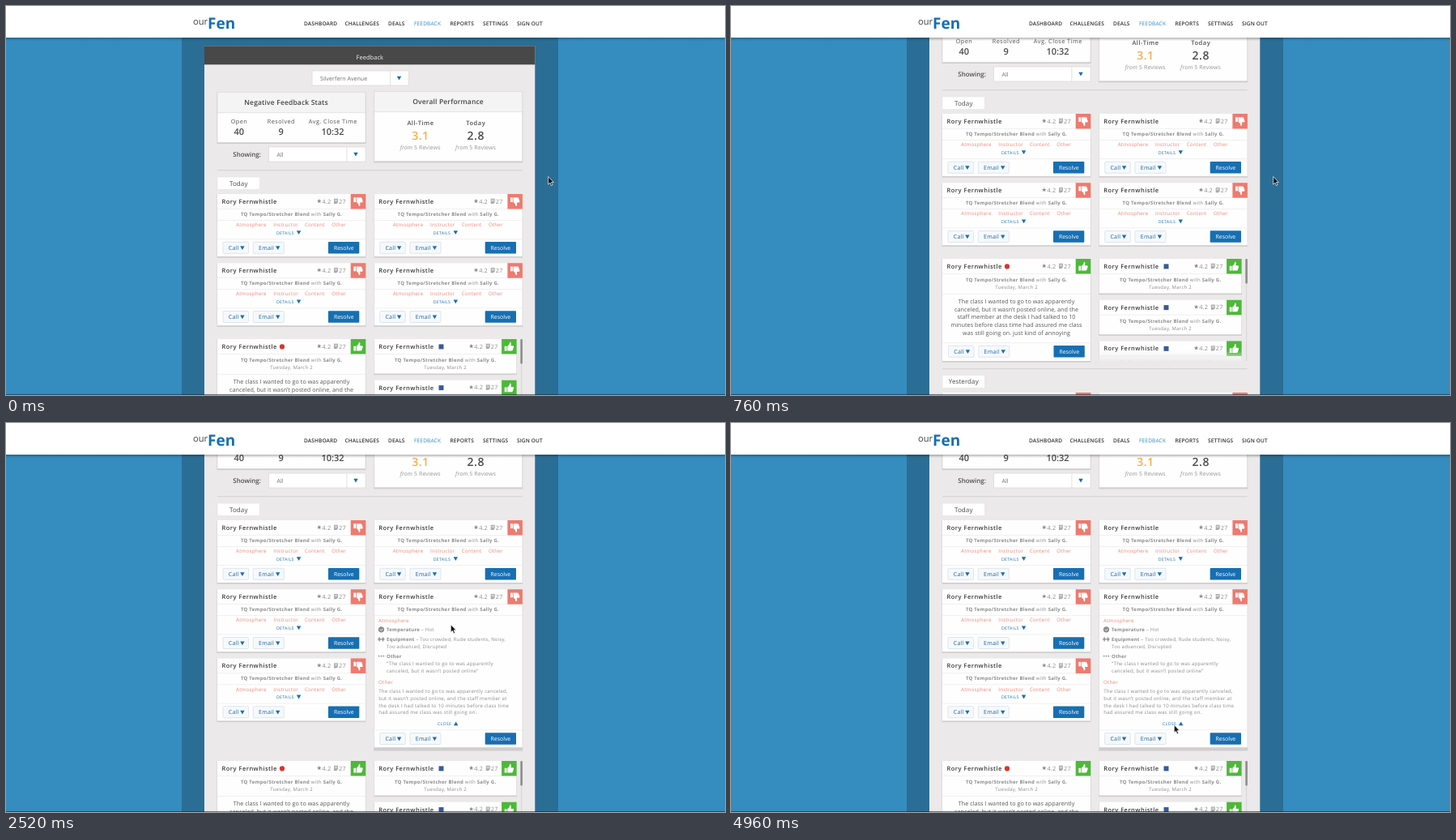
Animation, 888 px wide and 480 px high, one loop 5000 ms. Source, as an HTML page:

```html
<!DOCTYPE html>
<html lang="en">
<head>
<meta charset="utf-8">
<title>Feedback dashboard</title>
<style>
  html, body { margin: 0; width: 100%; height: 100%; overflow: hidden; background: #358cbe; }
  svg { display: block; width: 888px; height: 480px; }
  text { font-family: "Open Sans", sans-serif; text-rendering: geometricPrecision; white-space: pre; }
</style>
</head>
<body>
<svg id="stage" viewBox="0 0 888 480"></svg>
<script>
const LOOP = 5000, STEP = 40, GROW = 118, ROW = 85.2;
const BLUE = '#176fb1', CORAL = '#ef8679', RED = '#ee7a70', GREEN = '#4eb83a', GREY = '#8c8c8c', INK = '#4a4a4a';
const COL = [261, 454.7], CARD_W = 183, CARD_H = 77;
const PERSON = 'Rory Fernwhistle', LESSON = 'TQ Tempo/Stretcher Blend', COACH = 'Sally G.';

// Drawing helpers
const rect = (x, y, w, h, fill, more = '') =>
  `<rect x="${x}" y="${y}" width="${w}" height="${h}" fill="${fill}" ${more}/>`;
const path = (d, fill, more = '') => `<path d="${d}" fill="${fill}" ${more}/>`;
const group = (x, y, body, more = '') => `<g transform="translate(${x} ${y})" ${more}>${body}</g>`;
const rule = (x, y, w, fill = '#ededed') => rect(x, y, w, .8, fill);
const text = (x, y, body, size, fill = INK, { weight = 400, gap = 0, at = 'start' } = {}) =>
  `<text x="${x}" y="${y}" font-size="${size}" fill="${fill}" font-weight="${weight}" letter-spacing="${gap}" text-anchor="${at}">${body}</text>`;
const mid = (x, y, body, size, fill, weight = 400, gap = 0) =>
  text(x + gap / 2, y, body, size, fill, { weight, gap, at: 'middle' });
const bold = s => `<tspan font-weight="700">${s}</tspan>`;
const arrow = (x, y, s = 1) => path(`M${x - 2.7} ${y - 2.3 * s}h5.4l-2.7 ${4.8 * s}z`, BLUE);
const sheet = (x, y, w, h, fill = '#fefefe') =>
  rect(x - .5, y + .4, w + 1, h + 1.3, '#000', 'opacity=".12"') + rect(x, y, w, h, fill);

function thumb(x, y, good) {
  const hand = 'M-6-.6h3v6h-3zM-2.2-.6L.2-3 1-6Q2.8-6 2.6-3.6L2.2-1.2H5Q6.2-1 6 .3L4.6 4.6Q4.2 5.4 3.2 5.4H-2.2z';
  return rect(x, y, 18.5, 18.5, good ? GREEN : RED) +
    group(x + 9.3, y + 9.4, path(hand, '#fff', `transform="scale(.95 ${good ? .95 : -.95})"`));
}

function star(x, y) {
  let d = '';
  for (let i = 0; i < 10; i++) {
    const a = i * Math.PI / 5, r = i % 2 ? 1.2 : 3;
    d += (i ? 'L' : 'M') + (x + r * Math.sin(a)).toFixed(2) + ' ' + (y - r * Math.cos(a)).toFixed(2);
  }
  return path(d + 'z', GREY);
}

const note = (x, y) => path(`M${x} ${y}h5v4.5l-1.8 1.8H${x}z`, '#a9a9a9') +
  path(`M${x + .8} ${y + 1.5}h3.4M${x + .8} ${y + 3}h3.4`, 'none', 'stroke="#fff" stroke-width=".6"');

// Card parts, placed from the top left of the card
function head(w, good, shift = 0) {
  const r = w - 60 + shift;
  return text(5.5, 12, PERSON, 7.5, '#3b3b3b', { weight: 600, gap: .47 }) +
    star(r + 2.8, 8.7) + text(r + 6.5, 11.6, '4.2', 7.3, GREY, { gap: .15 }) +
    note(r + 21, 5.8) + text(r + 27, 11.6, '27', 7.3, GREY, { gap: .3 }) +
    rule(0, 18, w - 18) + thumb(w - 18.3, 0, good);
}
const lesson = (w, y) =>
  mid(w / 2, y, `${bold(LESSON)} with ${bold(COACH)}`, 6, GREY, 400, .26);
const dated = w => lesson(w, 28.4) + mid(w / 2, 37.2, 'Tuesday, March 2', 6, GREY, 400, .27);

function foot() {
  const button = (x, w, label) =>
    rect(x, 59.3, w, 14, '#f6f9fc', 'stroke="#d3dde6" stroke-width=".7" rx="1"') +
    text(x + 6.8, 68.8, label, 7, '#1a639e', { gap: .2 }) + arrow(x + w - 7.6, 66.6);
  return rule(0, 55.3, CARD_W) + button(7, 31.5, 'Call') + button(44.3, 38, 'Email') +
    rect(137, 59, 38.3, 14.6, BLUE, 'rx=".8"') + mid(156.2, 68.8, 'Resolve', 6.9, '#fff');
}

function topics() {
  const words = [['Atmosphere', 23], ['Instructor', 69.3], ['Content', 108], ['Other', 141.2]];
  return words.map(([s, x]) => text(x, 40.2, s, 6.2, CORAL, { gap: .22 })).join('') +
    text(73, 49.5, 'DETAILS', 5.2, BLUE, { gap: .3 }) + arrow(100.6, 47.5);
}

const complaint = (x, y) => group(x, y, sheet(0, 0, CARD_W, CARD_H) + head(CARD_W, false) +
  lesson(CARD_W, 27) + rule(0, 32, CARD_W) + topics() + foot());

function details() {
  const small = (x, y, s) => text(x, y, s, 6, GREY, { gap: .2 });
  const lines = (x, y, list) => list.map((s, i) => text(x, y + i * 8.9, s, 6.1, GREY, { gap: .22 })).join('');
  const title = (y, s) => text(5.3, y, s, 6.2, CORAL, { gap: .22 });
  return title(40.5, 'Atmosphere') +
    '<circle cx="8.8" cy="49.6" r="3.6" fill="#8c8c8c"/>' +
    path('M7 49.5l1.8 1.6 1.8-2.4', 'none', 'stroke="#fff" stroke-width=".8"') +
    small(15.4, 51.8, bold('Temperature') + ' – Hot') +
    path('M5.3 60.3v2.8M6.6 59v5.4M10.8 59v5.4M12.1 60.3v2.8M6.6 61.7h4.2', 'none', 'stroke="#8c8c8c" stroke-width="1.1"') +
    small(15.4, 64, bold('Equipment') + ' – Too crowded, Rude students, Noisy,') +
    small(15.4, 73, 'Too advanced, Disrupted') +
    [6, 8.8, 11.6].map(x => `<circle cx="${x}" cy="82.4" r=".9" fill="#8c8c8c"/>`).join('') +
    small(15.4, 84.6, bold('Other')) +
    lines(15.4, 93.8, ['“The class I wanted to go to was apparently', 'canceled, but it wasn’t posted online”']) +
    title(116.6, 'Other') +
    lines(5.5, 127.6, ['The class I wanted to go to was apparently canceled,',
      'but it wasn’t posted online, and the staff member at',
      'the desk I had talked to 10 minutes before class time',
      'had assured me class was still going on.']) +
    text(78.3, 167.7, 'CLOSE', 5.2, BLUE, { gap: .3 }) + arrow(101, 165.8, -1);
}

const openable = () => group(COL[1], 232 + ROW,
  `<g id="sheet">${sheet(0, 0, CARD_W, CARD_H)}</g>` + head(CARD_W, false) + lesson(CARD_W, 27) +
  rule(0, 32, CARD_W) + `<g id="topics">${topics()}</g>` +
  `<g id="details" clip-path="url(#reveal)">${details()}</g><g id="foot">${foot()}</g>`);

function praise() {
  const story = ['The class I wanted to go to was apparently', 'canceled, but it wasn’t posted online, and the',
    'staff member at the desk I had talked to 10', 'minutes before class time had assured me class',
    'was still going on. just kind of annoying'];
  const big = sheet(0, 0, CARD_W, 126) + head(CARD_W, true) + dated(CARD_W) + rule(0, 43.3, CARD_W) +
    story.map((s, i) => mid(91.5, 54.7 + i * 9.8, s, 7.2, '#575757', 400, .05)).join('') +
    group(.5, 48, foot()) + '<circle cx="80" cy="9.4" r="3.1" fill="#d8352c"/>';
  const item = i => group(0, i * 50.7, sheet(0, 0, 175.7, 42.5) + head(175.7, true, 1.4) + dated(175.7) +
    rect(79.8, 6.4, 6, 6, '#3a5a98'));
  const list = `<g clip-path="url(#list)">${item(0) + item(1) + item(2)}</g>` + rect(-1, 113, 178, 14, 'url(#fade)') +
    rect(181.3, 0, 1.2, 126, '#d9d6d6') + rect(180.6, 0, 2.6, 30.5, '#8d8d8d', 'rx="1"');
  return group(COL[0], 411, big) + group(COL[1], 411, list);
}

const tag = (y, s) => rect(261, y, 52.5, 15.6, '#fff', 'stroke="#e0dddd" stroke-width=".5"') + mid(287.2, y + 10.8, s, 8, INK, 400, .1);
const picker = (x, y, w, s) => rect(x, y, w, 18, '#fff', 'stroke="#d9d7d7" stroke-width=".7"') +
  rect(x + w - 23.5, y, .8, 18, '#dcdada') + text(x + 10, y + 12, s, 7, '#6a6a6a', { gap: .05 }) + arrow(x + w - 12, y + 9);

function summary() {
  const box = (x, y, w, h, cut) => sheet(x, y, w, h) + rect(x, y, w, cut, '#f4f4f4') + rule(x, y + cut, w, '#dedcdc') +
    `<rect x="${x}" y="${y}" width="${w}" height="${h}" fill="none" stroke="#d9d7d7" stroke-width=".7"/>`;
  const stat = (x, label, value) => mid(x, 145, label, 7.3, '#555', 400, .45) + mid(x, 159.2, value, 11, INK, 600);
  const score = (x, label, value, fill) => mid(x, 147.4, label, 7.5, '#505050', 600, .5) +
    mid(x, 165, value, 14, fill, 600, .5) + mid(x, 177.3, '<tspan font-style="italic">from</tspan> 5 Reviews', 7, '#969696', 400, .1);
  return picker(378, 80, 119.5, 'Silverfern Avenue') +
    box(261, 106.3, 183, 62, 25) + mid(346, 122.3, 'Negative Feedback Stats', 8.5, '#454545', 600, .15) +
    stat(287.7, 'Open', '40') + stat(339.7, 'Resolved', '9') + stat(403.5, 'Avg. Close Time', '10:32') +
    box(454.7, 105.3, 183, 86.4, 25) + mid(546, 121, 'Overall Performance', 8.5, '#454545', 600, .15) +
    score(511.7, 'All-Time', '3.1', '#f5ae4b') + score(580, 'Today', '2.8', INK) +
    text(280.3, 186, 'Showing:', 8, '#505050', { weight: 600 }) + picker(324.5, 174, 119.5, 'All');
}

function navbar() {
  const links = [['DASHBOARD', 368], ['CHALLENGES', 418.5], ['DEALS', 472], ['FEEDBACK', 504],
    ['REPORTS', 548.5], ['SETTINGS', 589], ['SIGN OUT', 631]];
  return rect(0, 39, 888, 4, 'url(#shade)') + rect(0, 0, 888, 39, '#fff') +
    text(231, 22.5, 'our', 11.2, '#444') + text(249, 27.5, 'Fen', 19, BLUE, { weight: 700 }) +
    links.map(([s, x]) => s === 'FEEDBACK'
      ? text(x, 24, s, 6.5, '#2a86c4', { gap: .2 })
      : text(x, 24, s, 6.5, '#2e2e2e', { weight: 600, gap: .15 })).join('');
}

const pointers =
  `<g id="arrow">${path('M0 0v9.6l2.2-2 1.5 3.5 1.6-.7-1.5-3.4h2.9z', '#111', 'stroke="#fff" stroke-width=".7"')}</g>` +
  `<g id="hand">${path('M-1 .8Q0-.6 1 .8V4.2Q2-.1+3.7 2.8 4.5Q3.8 4 4.4 5Q5.4 4.8 5.5 6V8.2Q5.2 9.8 4.4 11.4H-.4Q-2-.1 9.4-3.2 7.4-3 6-1 7.2z'
    .replace('Q2-.1+3.7', 'Q2 3.6').replace('Q-2-.1 9.4-3.2 7.4-3 6-1 7.2z', 'Q-1.4 9.4-3 7.2Q-2.6 5.6-1 7.2z'), '#fff', 'stroke="#222" stroke-width=".8" stroke-linejoin="round"')}</g>`;

const $ = id => document.getElementById(id);
$('stage').innerHTML = `<defs>
  <linearGradient id="shade" x2="0" y2="1"><stop stop-color="#000" stop-opacity=".28"/><stop offset="1" stop-opacity="0"/></linearGradient>
  <linearGradient id="fade" x2="0" y2="1"><stop stop-color="#ebe9e9" stop-opacity="0"/><stop offset="1" stop-color="#ebe9e9" stop-opacity=".9"/></linearGradient>
  <clipPath id="list"><rect x="-1" y="-1" width="178" height="127"/></clipPath>
  <clipPath id="reveal"><rect id="window" y="32" width="183" height="23"/></clipPath></defs>` +
  rect(0, 0, 888, 480, '#358cbe') + rect(217, 0, 465, 480, '#2a6e96') +
  `<g id="page">` + rect(245, 49.3, 408.3, 900, '#ebe9e9') + rect(245, 49.3, 408.3, 23, '#484848') +
  mid(449.3, 66, 'Feedback', 7.5, '#f2f2f2', 400, .05) + summary() +
  rule(261, 202.4, 376.5, '#cbc8c8') + tag(211, 'Today') +
  complaint(COL[0], 232) + complaint(COL[1], 232) + complaint(COL[0], 232 + ROW) +
  `<g id="extra">${complaint(COL[0], 232 + 2 * ROW)}</g>` + openable() +
  `<g id="lower">${praise() + rule(261, 546.4, 376.5, '#cbc8c8') + tag(554.6, 'Yesterday') +
    complaint(COL[0], 576) + complaint(COL[1], 576)}</g></g>` +
  navbar() + rect(0, 479, 888, 1, '#15222c', 'opacity=".6"') + `<g id="cursor">${pointers}</g>`;

// Motion: [time, value...]
const SCROLL = [[160, 0], [280, 4], [360, 13], [440, 33], [520, 56], [600, 75], [680, 89], [760, 99], [840, 106], [920, 110.3], [1120, 112]];
const CURSOR = [[1120, 669.7, 210.5], [1760, 549.3, 248.7], [2880, 549.3, 248.7], [3680, 547.2, 365], [4320, 547.2, 365], [4600, 547.3, 372.6]];
const OPEN = [[1960, 0], [2320, 1]];
const smooth = k => k * k * (3 - 2 * k);
const same = k => k;

function track(keys, t, ease) {
  if (t <= keys[0][0]) return keys[0].slice(1);
  const i = keys.findIndex(key => key[0] > t);
  if (i < 0) return keys[keys.length - 1].slice(1);
  const a = keys[i - 1], b = keys[i], k = ease((t - a[0]) / (b[0] - a[0]));
  return a.slice(1).map((v, n) => v + (b[n + 1] - v) * k);
}

const move = (id, x, y) => $(id).setAttribute('transform', `translate(${x} ${y})`);
const alpha = (id, v) => $(id).setAttribute('opacity', v);

function draw(now) {
  const t = Math.floor(now % LOOP / STEP) * STEP;
  const [open] = track(OPEN, t, smooth), grow = GROW * open;
  move('page', 0, -track(SCROLL, t, same)[0]);
  move('lower', 0, grow);
  move('foot', 0, grow);
  $('sheet').setAttribute('transform', `scale(1 ${(CARD_H + grow) / CARD_H})`);
  $('window').setAttribute('height', 23 + grow);
  alpha('topics', Math.max(0, 1 - open * 3));
  alpha('details', Math.min(1, open * 2));
  alpha('extra', Math.max(0, open * 2 - 1));
  move('cursor', ...track(CURSOR, t, smooth));
  const link = (t >= 1720 && t < 2040) || (t >= 3600 && t < 4440);
  alpha('hand', +link);
  alpha('arrow', +!link);
}

let start;
function tick(now) {
  start ??= now;
  draw(now - start);
  requestAnimationFrame(tick);
}
draw(0);
requestAnimationFrame(tick);
</script>
</body>
</html>
```
